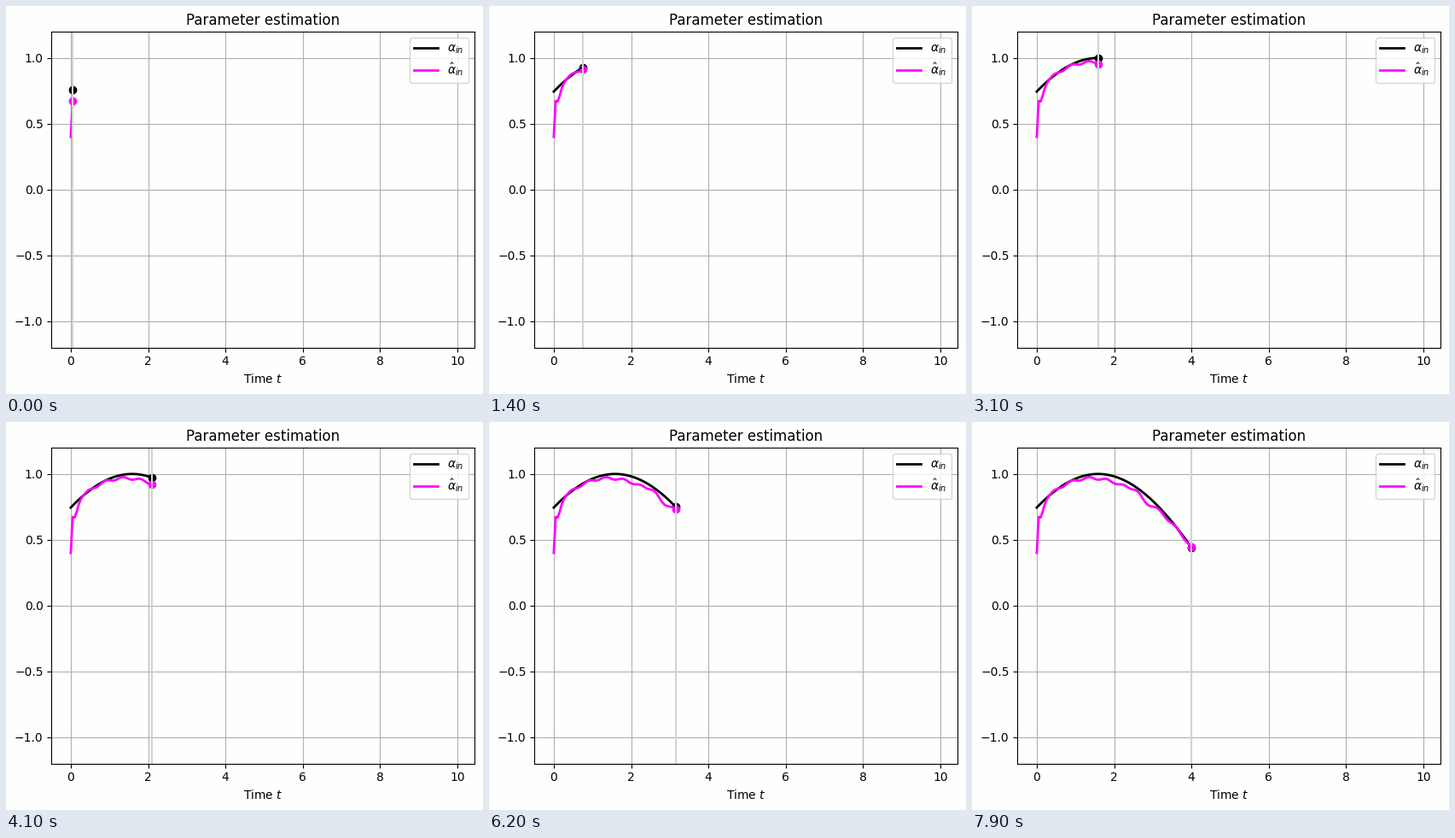
Recreate the animation shown at these times as a matplotlib script. Size 559x454 px, loop 8000 ms.

```python
import numpy as np
import matplotlib.pyplot as plt
from matplotlib.animation import FuncAnimation

W, H, DPI = 559, 454, 100
LEFT, TOP, AX_W, AX_H = 53.35, 30.0, 496, 369.6
DT, FRAMES = 0.05, 80
PAPER = "#fdfffc"


def bell(t, center, width):
    return np.exp(-((t - center) / width) ** 2)


def true_value(t):
    return np.sin(0.461 * t + 0.840)


def estimate_value(t):
    """True value plus start-up error, slow bias, ripple and one late swing."""
    startup = -0.11 * bell(t, 0.09, 0.1)
    bias = 0.009 * np.sin(np.pi * t / 2) - 0.045 * np.sin(np.pi * t / 4) ** 2
    ripple = 0.009 * np.cos(2 * np.pi * t / 0.45)
    swing = -0.28 * (t - 2.68) * bell(t, 2.68, 0.2)
    est = true_value(t) + startup + bias + ripple + swing
    est[0] = 0.4  # initial guess
    return est


t = np.arange(FRAMES + 1) * DT

plt.rcParams["font.family"] = "DejaVu Sans"
fig = plt.figure(figsize=(W / DPI, H / DPI), dpi=DPI, facecolor=PAPER)
ax = fig.add_axes([LEFT / W, 1 - (TOP + AX_H) / H, AX_W / W, AX_H / H],
                  facecolor=PAPER)
ax.set_xlim(-0.4975, 10.4475)
ax.set_ylim(-1.2, 1.2)
ax.set_yticks(np.arange(-1, 1.1, 0.5))
ax.set_title("Parameter estimation")
ax.set_xlabel("Time $t$")
ax.grid(True)
ax.set_axisbelow(True)


def make_series(values, color, label):
    line, = ax.plot([], [], color=color, lw=2, label=label)
    dot = ax.scatter([0], [0], color=color)
    return values, line, dot


series = [make_series(true_value(t), "black", r"$\alpha_{in}$"),
          make_series(estimate_value(t), "magenta", r"$\hat{\alpha}_{in}$")]
cursor = ax.axvline(0, color="lightgray")
ax.legend(loc="upper right")


def update(frame):
    n = frame + 1
    for values, line, dot in series:
        line.set_data(t[:n + 1], values[:n + 1])
        dot.set_offsets([[t[n], values[n]]])
    cursor.set_xdata([t[n], t[n]])
    return [cursor]


anim = FuncAnimation(fig, update, frames=FRAMES, interval=100,
                     repeat=True, repeat_delay=0, blit=False)
plt.show()
```
